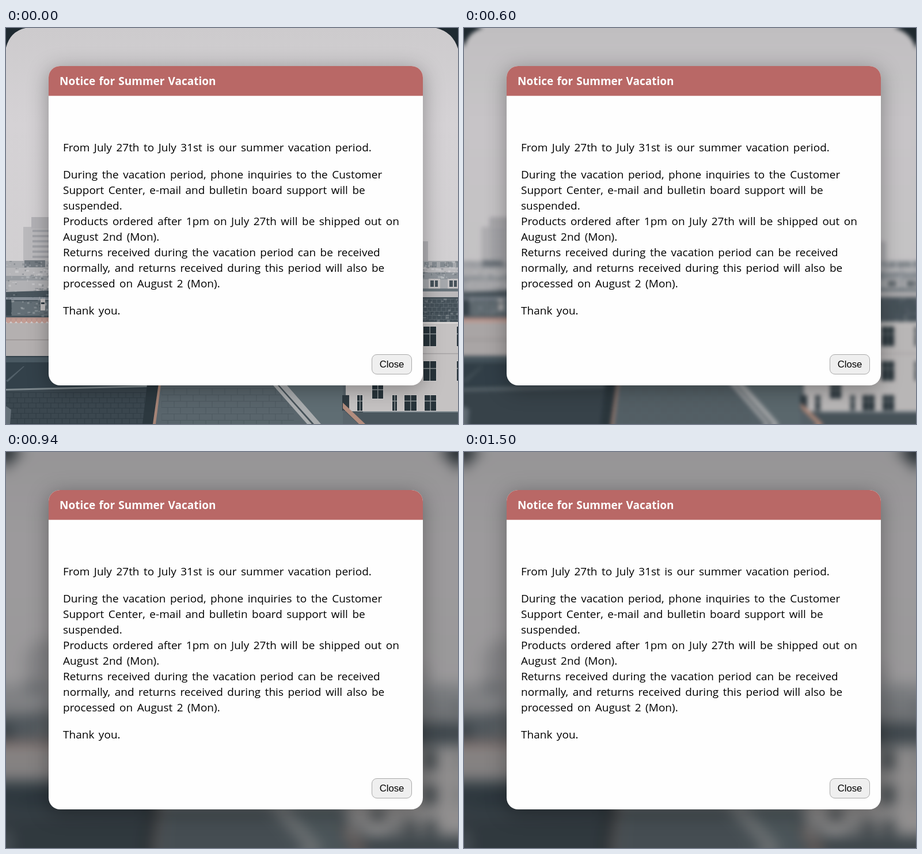
Animation, 785 px wide and 687 px high, one loop 2360 ms. Source, as an HTML page with a canvas:

```html
<!DOCTYPE html>
<html lang="en">
<head>
<meta charset="utf-8">
<title>Notice</title>
<style>
html, body { margin: 0; width: 100%; height: 100%; overflow: hidden; }
#stage { position: absolute; inset: 0; width: 785px; height: 687px; overflow: hidden; }
canvas { position: absolute; left: -60px; top: -60px; }
#shade { position: absolute; inset: 0; background: rgb(30, 30, 30); opacity: 0; }
#modal {
  position: absolute; left: 74px; top: 66px; width: 650px; height: 554px;
  border-radius: 20px; background: #fefefe; box-shadow: 0 6px 36px rgba(0, 0, 0, .34);
  font: 19px/27px "Open Sans", "Noto Sans", sans-serif; color: #000; white-space: nowrap;
}
h1 {
  margin: 0; height: 51px; padding-left: 19px; border-radius: 20px 20px 0 0;
  border-bottom: 1px solid #d09a98;
  background: #b96866; color: #fff; font: bold 19px/53px "Open Sans", "Noto Sans", sans-serif;
  word-spacing: 1.2px;
}
#text { position: absolute; left: 25px; top: 128px; word-spacing: 2.55px; }
p { margin: 0 0 20px; }
#close {
  position: absolute; left: 561px; top: 500px; width: 68px; height: 33px;
  border: 1px solid #a9a9a9; border-radius: 9px; background: #efefef;
  font: 16.7px/33px "Liberation Sans", Arial, sans-serif; text-align: center;
}
</style>
</head>
<body>
<div id="stage">
  <canvas></canvas>
  <div id="shade"></div>
  <div id="modal">
    <h1>Notice for Summer Vacation</h1>
    <div id="text">
      <p>From July 27th to July 31st is our summer vacation period.</p>
      <p>During the vacation period, phone inquiries to the Customer<br>
      Support Center, e-mail and bulletin board support will be<br>
      suspended.<br>
      Products ordered after 1pm on July 27th will be shipped out on<br>
      August 2nd (Mon).<br>
      Returns received during the vacation period can be received<br>
      normally, and returns received during this period will also be<br>
      processed on August 2 (Mon).</p>
      <p>Thank you.</p>
    </div>
    <div id="close">Close</div>
  </div>
</div>
<script>
const W = 785, H = 687, M = 60;
const scene = document.createElement('canvas');
scene.width = W; scene.height = H;
const c = scene.getContext('2d');

let seed = 7;
function random() {
  seed = seed * 16807 % 2147483647;
  return seed / 2147483647;
}
function rect(color, x, y, w, h) {
  c.fillStyle = color;
  c.fillRect(x, y, w, h);
}
function poly(color, ...pts) {
  c.fillStyle = color;
  c.beginPath();
  for (let i = 0; i < pts.length; i += 2) c.lineTo(pts[i], pts[i + 1]);
  c.fill();
}
// Small light and dark marks that roughen a surface
function marks(x, y, w, h, n, alpha) {
  for (let i = 0; i < n; i++) {
    const tone = i % 2 ? '255,255,255' : '40,52,60';
    rect(`rgba(${tone},${alpha})`, x + random() * w, y + random() * h, 1 + random() * 5, 1 + random() * 3);
  }
}
// Rows of staggered roof tiles
function tiles(color, x, y, w, h, tw, th) {
  c.save();
  c.beginPath();
  c.rect(x, y, w, h);
  c.clip();
  c.strokeStyle = color;
  c.beginPath();
  for (let j = 0; j * th < h; j++) {
    const ty = y + j * th + .5;
    c.moveTo(x, ty);
    c.lineTo(x + w, ty);
    for (let tx = x + (j % 2) * tw / 2; tx < x + w; tx += tw) {
      c.moveTo(tx, ty);
      c.lineTo(tx, ty + th);
    }
  }
  c.stroke();
  c.restore();
}
function sashWindow(x, y, w, h) {
  rect('#d3d0d0', x - 1, y - 1, w + 2, h + 2);
  rect('#27333a', x, y, w, h);
  rect('#8f9698', x + w / 2 - .5, y, 1.5, h);
  rect('#8f9698', x, y + h * .35, w, 1.5);
}

function drawSky() {
  const g = c.createLinearGradient(0, 0, 0, 420);
  g.addColorStop(0, '#cdcbcd');
  g.addColorStop(.4, '#d5d2d5');
  g.addColorStop(1, '#d1cfd1');
  rect(g, 0, 0, W, H);
  c.fillStyle = '#1f2a31';
  c.beginPath();
  c.moveTo(0, 0); c.lineTo(34, 0); c.quadraticCurveTo(7, 6, 0, 34);
  c.moveTo(W, 0); c.lineTo(747, 0); c.quadraticCurveTo(776, 7, W, 36);
  c.fill();
}

function drawLeft() {
  rect('#bab9bc', 30, 345, 60, 70);
  rect('#b3b2b6', 44, 328, 46, 20);
  for (let y = 350; y < 400; y += 9) rect('#a2a3a8', 46, y, 28, 4);
  rect('#a8aaae', 0, 404, 90, 60);
  rect('#737a81', 32, 403, 36, 12);
  rect('#b6b6b9', 0, 416, 90, 14);
  rect('#989ca1', 0, 430, 90, 9);
  rect('#b1b1b4', 6, 438, 80, 18);
  marks(0, 404, 80, 54, 90, .22);
  poly('#49555d', 0, 458, 90, 455, 90, 505, 0, 503);
  rect('#89919a', 0, 467, 90, 5);
  rect('#646f76', 10, 474, 70, 25);
  marks(0, 460, 80, 40, 50, .2);
  rect('#c2bfbf', 60, 470, 8, 20);
  rect('#303d45', 61, 476, 6, 3);
  rect('#38454d', 0, 471, 9, 28);
  rect('#b4b0b0', 0, 512, 90, 58);
  rect('#b3938c', 0, 502, 90, 7);
  for (let x = 4; x < 90; x += 9) {
    c.fillStyle = '#c29c93';
    c.beginPath();
    c.arc(x, 508, 4, 0, 7);
    c.fill();
  }
  rect('#a09b9b', 0, 540, 90, 2);
  rect('#33414a', 0, 569, 260, 60);
  poly('#4a5962', 0, 571, 90, 571, 90, 580, 0, 580);
  poly('#526069', 0, 612, 30, 587, 32, 587, 3, 614);
}

function drawRight() {
  rect('#b4b3b7', 718, 370, 15, 40);
  rect('#a5a8ac', 710, 404, 75, 62);
  for (let x = 726; x < W; x += 14) rect('#858c92', x, 406, 8, 9);
  rect('#bababd', 710, 416, 75, 8);
  rect('#8e949a', 710, 424, 75, 12);
  marks(720, 404, 65, 32, 60, .22);
  for (const x of [737, 770]) {
    rect('#c4c2c3', x - 3, 435, 20, 20);
    rect('#46525a', x, 438, 13, 11);
    rect('#c4c2c3', x + 6, 438, 2, 11);
  }
  rect('#69747b', 710, 452, 75, 5);
  rect('#bbb9bb', 710, 457, 75, 10);
  rect('#455159', 700, 467, 85, 43);
  tiles('#5e6970', 724, 470, 61, 38, 8, 7);
  marks(722, 468, 63, 40, 50, .2);
  rect('#c5c2c2', 585, 510, 200, 156);
  rect('#dad7d6', 710, 510, 75, 3);
  for (const y of [518, 578]) {
    sashWindow(725, y, 22, 34);
    sashWindow(783, y, 20, 34);
  }
  rect('#aeabac', 710, 564, 75, 2);
}

function drawFront() {
  rect('#3b474f', 0, 626, 265, 61);
  tiles('#303c44', 0, 632, 245, 55, 13, 9);
  poly('#7c878c', 0, 626, 245, 620, 245, 623, 0, 629);
  poly('#657078', 0, 656, 9, 662, 7, 687, 0, 687);
  poly('#59656c', 268, 610, 590, 610, 590, 687, 255, 687);
  tiles('#4e5a61', 270, 625, 230, 62, 22, 11);
  poly('#2c383f', 246, 610, 268, 610, 258, 687, 237, 687);
  poly('#a58477', 266, 610, 270, 610, 260, 687, 255, 687);
  poly('#5f6d73', 474, 610, 585, 610, 585, 687, 535, 687);
  poly('#aaadaf', 457, 612, 481, 612, 547, 687, 523, 687);
  poly('#465259', 470, 618, 473, 618, 535, 687, 531, 687);
  rect('#2f3b42', 584, 637, 12, 27);
  sashWindow(610, 637, 9, 27);
  sashWindow(636, 618, 19, 25);
  sashWindow(671, 637, 8, 27);
  sashWindow(692, 637, 21, 27);
  sashWindow(727, 637, 20, 27);
  rect('#4a565d', 585, 665, 200, 22);
  rect('#78838a', 620, 665, 165, 2);
  poly('#59656c', 585, 662, 612, 687, 585, 687);
  poly('#b38d7e', 585, 650, 624, 687, 613, 687, 585, 660);
}

drawSky();
drawLeft();
drawRight();
drawFront();

// Mirror the borders so the blur has no fading edge
const view = document.querySelector('canvas');
view.width = W + 2 * M;
view.height = H + 2 * M;
const v = view.getContext('2d');
for (const i of [-1, 1, 0]) for (const j of [-1, 1, 0]) {
  v.setTransform(i ? -1 : 1, 0, 0, j ? -1 : 1, M + (i > 0 ? 2 * W : 0), M + (j > 0 ? 2 * H : 0));
  v.drawImage(scene, 0, 0);
}

const LOOP = 2360, steps = [0, 460, 530, 600, 670, 740, 810, 940];
const shade = document.getElementById('shade');
function frame(now) {
  const t = now % LOOP;
  const step = steps.filter(s => s <= t).pop() || 0;
  const p = Math.min(1, Math.max(0, (step - 450) / 490));
  view.style.filter = p ? `blur(${12 * p}px)` : 'none';
  shade.style.opacity = .31 * p ** 1.2;
  requestAnimationFrame(frame);
}
requestAnimationFrame(frame);
</script>
</body>
</html>
```
